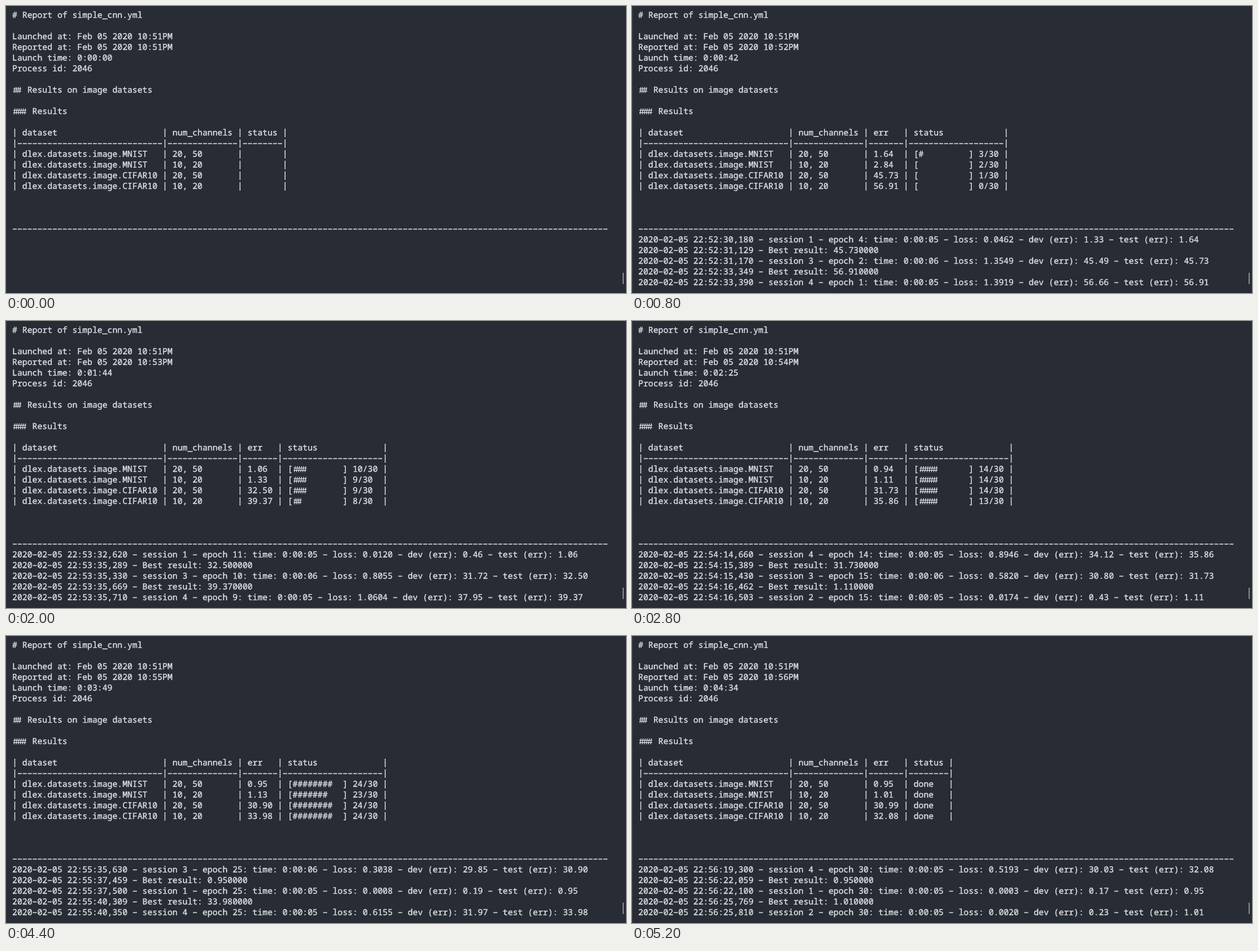
These frames come from a looping animation (1098x510 px, 5.6 s). An HTML page with a canvas:

```html
<!DOCTYPE html>
<html lang="en">
<head>
<meta charset="utf-8">
<title>Training report</title>
<style>
  html, body { margin: 0; width: 100%; height: 100%; overflow: hidden; background: #282c34; }
  canvas { display: block; width: 1098px; height: 510px; }
</style>
</head>
<body>
<canvas id="stage" width="1098" height="510"></canvas>
<script>
const ctx = document.getElementById('stage').getContext('2d');
const CELL = 8.865, LINE = 19, LEFT = 11.1, BASE = 21.2;
const STEP = 400, SCREENS = 14, EPOCHS = 30;
const LAUNCH = 51 * 60 + 51; // seconds past 22:00

// Key points: screens, the seconds run by then, and each session's error there
const KEYS = [0, 2, 5, 7, 9, 11, 13];
const RUN = [0, 42, 104, 145, 189, 229, 274];

// An epoch ends at first + period * n - gain * n^2; loss falls off exponentially
const SESSIONS = [
  { data: 'MNIST', channels: '20, 50', first: 3.5, period: 8.92, gain: 0, seconds: 5,
    loss: 0.1, decay: 0.193, gap: 0.8, err: [4.5, 1.64, 1.06, 0.94, 0.86, 0.95, 0.95] },
  { data: 'MNIST', channels: '10, 20', first: 12.1, period: 9.03, gain: 0.0091, seconds: 5,
    loss: 0.153, decay: 0.145, gap: 0.8, err: [6.2, 2.84, 1.33, 1.11, 1.16, 1.13, 1.01] },
  { data: 'CIFAR10', channels: '20, 50', first: 24.13, period: 8.02, gain: 0, seconds: 6,
    loss: 1.543, decay: 0.065, gap: 1.1, err: [60, 45.73, 32.5, 31.73, 30.69, 30.9, 30.99] },
  { data: 'CIFAR10', channels: '10, 20', first: 34.6, period: 7.79, gain: 0, seconds: 5,
    loss: 1.44, decay: 0.034, gap: 2.1, err: [70, 56.91, 39.37, 35.86, 34.14, 33.98, 32.08] }
];

function keyed(values, screen) {
  const i = Math.max(1, KEYS.findIndex(k => k >= screen));
  const f = (screen - KEYS[i - 1]) / (KEYS[i] - KEYS[i - 1]);
  return values[i - 1] + (values[i] - values[i - 1]) * f;
}

const pad = (n, size = 2) => String(n).padStart(size, '0');

function stamp(seconds) {
  const ms = Math.round((LAUNCH + seconds) * 1000);
  const whole = Math.floor(ms / 1000);
  return `2020-02-05 22:${pad(Math.floor(whole / 60))}:${pad(whole % 60)},${pad(ms % 1000, 3)} - `;
}

function finishedEpochs(run) {
  const events = [];
  SESSIONS.forEach((session, id) => {
    for (let epoch = 1; epoch <= EPOCHS; epoch++) {
      const time = session.first + session.period * epoch - session.gain * epoch ** 2;
      if (time < run + 1) events.push({ session, id, epoch, time });
    }
  });
  return events.sort((a, b) => a.time - b.time);
}

function status(epochs) {
  if (epochs === EPOCHS) return 'done';
  const done = epochs - 1;
  return `[${'#'.repeat(Math.floor(done / 3)).padEnd(10)}] ${done}/${EPOCHS}`;
}

function tableLines(events, screen, reported) {
  const columns = [
    ['dataset', ...SESSIONS.map(s => 'dlex.datasets.image.' + s.data)],
    ['num_channels', ...SESSIONS.map(s => s.channels)]
  ];
  if (reported) columns.push(['err', ...SESSIONS.map(s => keyed(s.err, screen).toFixed(2))]);
  columns.push(['status', ...SESSIONS.map(s =>
    reported ? status(events.filter(e => e.session === s).length) : '')]);

  const widths = columns.map(c => Math.max(...c.map(s => s.length)));
  const lines = columns[0].map((_, r) =>
    '| ' + columns.map((c, i) => c[r].padEnd(widths[i])).join(' | ') + ' |');
  lines.splice(1, 0, '|' + widths.map(w => '-'.repeat(w + 2)).join('|') + '|');
  return lines;
}

function logLines(events, screen) {
  return events.slice(-3).flatMap(({ session, id, epoch, time }) => {
    const test = keyed(session.err, screen);
    const dev = test - session.gap * (1 - Math.exp(-epoch / 8));
    const loss = session.loss * Math.exp(-session.decay * epoch);
    return [
      `${stamp(time - 0.041)}Best result: ${test.toFixed(2)}0000`,
      `${stamp(time)}session ${id + 1} - epoch ${epoch}: time: 0:00:0${session.seconds}` +
        ` - loss: ${loss.toFixed(4)} - dev (err): ${dev.toFixed(2)} - test (err): ${test.toFixed(2)}`
    ];
  }).slice(-5);
}

function screenLines(screen) {
  const run = Math.floor(keyed(RUN, screen));
  const events = screen ? finishedEpochs(run) : [];
  const reported = screen > 1; // the report trails the first log lines
  const shownRun = reported ? run : 0;
  return [
    '# Report of simple_cnn.yml', '',
    'Launched at: Feb 05 2020 10:51PM',
    `Reported at: Feb 05 2020 10:${Math.floor((LAUNCH + shownRun) / 60)}PM`,
    `Launch time: 0:${pad(Math.floor(shownRun / 60))}:${pad(shownRun % 60)}`,
    'Process id: 2046', '',
    '## Results on image datasets', '',
    '### Results', '',
    ...tableLines(events, screen, reported), '', '', '',
    '-'.repeat(119),
    ...logLines(events, screen)
  ];
}

// Joined hash signs, as a coding font sets runs of two to four
function drawHashes(x, top, count) {
  const right = x + count * CELL, strokes = count * 2;
  const pitch = (right - x - 8) / (strokes - 1);
  ctx.lineWidth = 1.3;
  ctx.beginPath();
  for (const y of [top + 14.3, top + 18.3]) {
    ctx.moveTo(x + 1.8, y);
    ctx.lineTo(right - 1.8, y);
  }
  for (let i = 0; i < strokes; i++) {
    const mid = x + 4 + i * pitch;
    ctx.moveTo(mid + 0.9, top + 11);
    ctx.lineTo(mid - 0.9, top + 21.3);
  }
  ctx.stroke();
}

// A thin outline gives the medium weight
function drawGlyph(ch, x, y) {
  ctx.lineWidth = 0.4;
  ctx.fillText(ch, x, y);
  ctx.strokeText(ch, x, y);
}

function drawLine(text, row) {
  const top = row * LINE;
  for (let col = 0; col < text.length; col++) {
    const ch = text[col], x = LEFT + col * CELL;
    if (ch === '-') ctx.fillRect(x + 0.9, top + 15.7, CELL - 1.8, 1.6);
    else if (ch === '|') ctx.fillRect(x + CELL / 2 - 0.75, top + 9, 1.5, 15);
    else if (ch === '#') {
      const run = text.slice(col).match(/^#+/)[0].length;
      if (run > 1 && run < 5) drawHashes(x, top, run);
      else for (let i = 0; i < run; i++) drawGlyph('#', x + i * CELL, top + BASE);
      col += run - 1;
    } else if (ch !== ' ') drawGlyph(ch, x, top + BASE);
  }
}

function draw(screen) {
  ctx.fillStyle = '#282c34';
  ctx.fillRect(0, 0, 1098, 510);
  ctx.fillStyle = '#3a3d42';
  ctx.fillRect(0, 0, 1, 510);
  ctx.fillStyle = '#8b8e93';
  ctx.fillRect(1092, 474, 2, 20);
  ctx.font = '14.775px "Noto Sans Mono", "DejaVu Sans Mono", monospace';
  ctx.textRendering = 'geometricPrecision';
  ctx.lineJoin = 'round';
  ctx.fillStyle = ctx.strokeStyle = '#dcdfe4';
  screenLines(screen).forEach(drawLine);
}

const start = performance.now();
let shown = -1;
function tick() {
  const screen = Math.floor(Math.max(0, performance.now() - start) / STEP) % SCREENS;
  if (screen !== shown) draw(shown = screen);
  requestAnimationFrame(tick);
}
tick();
</script>
</body>
</html>
```
